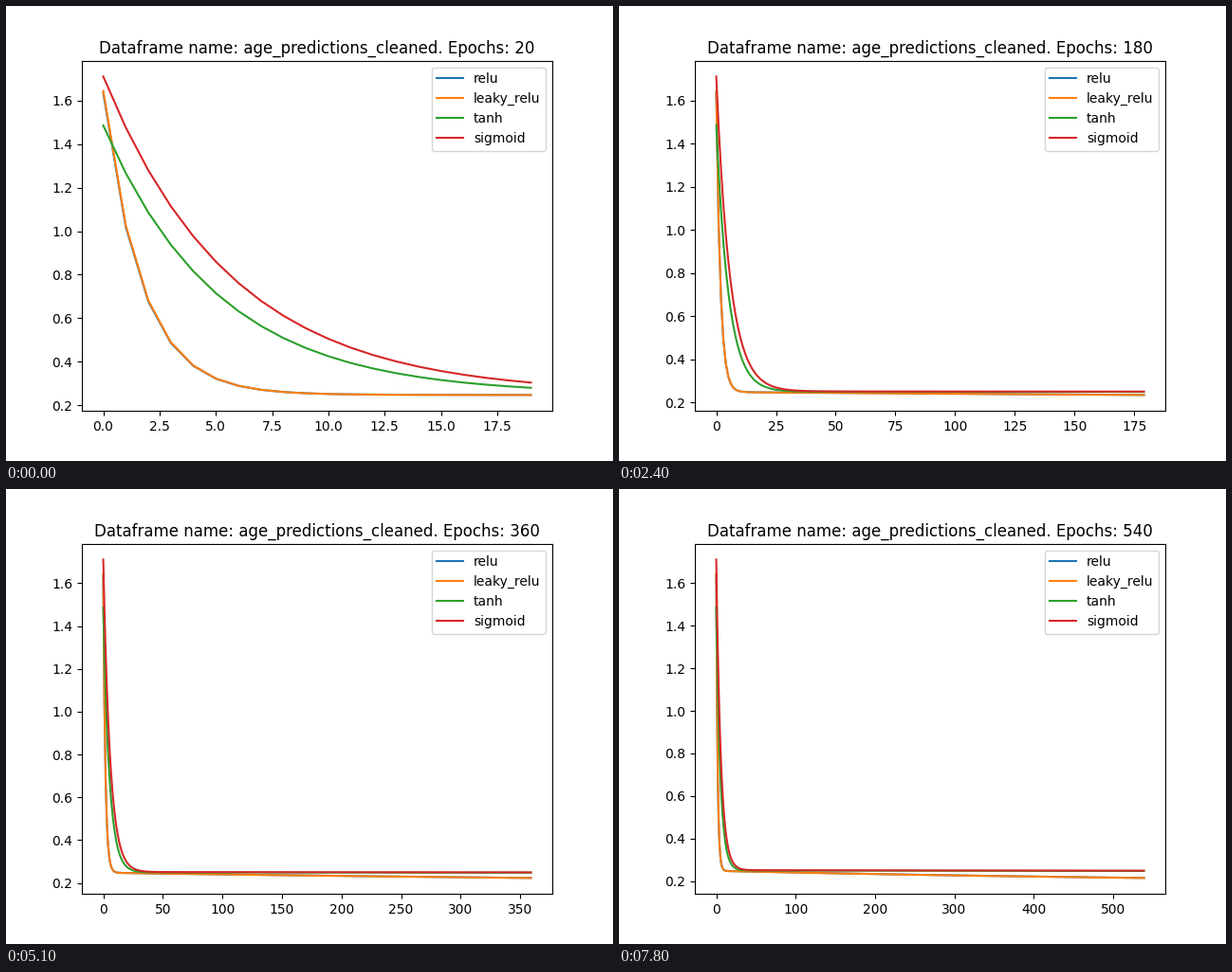
These frames come from a looping animation (640 by 480 pixels, 8000 ms). A matplotlib script:

```python
import numpy as np
import matplotlib.pyplot as plt
from matplotlib.animation import FuncAnimation

LOOP_MS = 8000
TICK_MS = 100
TICKS_PER_STEP = 3
EPOCHS_PER_STEP = 20


def saturating(start, floor, rate, drift):
    """Loss that decays geometrically to a slowly sinking floor."""
    return lambda t: floor + (start - floor) * rate ** t - drift(t)


def learning(t):
    return 0.0705 * (1 - np.exp(-t / 830))


def stalled(t):
    return 4e-6 * t


LOSSES = {
    "relu": saturating(1.635, 0.2483, 0.556, learning),
    "leaky_relu": saturating(1.645, 0.2479, 0.557, learning),
    "tanh": saturating(1.486, 0.2495, 0.8225, stalled),
    "sigmoid": saturating(1.711, 0.2510, 0.8395, stalled),
}

fig, ax = plt.subplots(figsize=(6.4, 4.8), dpi=100)
lines = {name: ax.plot([], [], label=name)[0] for name in LOSSES}
ax.legend(loc="upper right")


def draw(tick):
    epochs = EPOCHS_PER_STEP * (tick // TICKS_PER_STEP + 1)
    t = np.arange(epochs)
    for name, line in lines.items():
        line.set_data(t, LOSSES[name](t))
    ax.relim()
    ax.autoscale_view()
    ax.set_title(f"Dataframe name: age_predictions_cleaned. Epochs: {epochs}")
    return list(lines.values())


anim = FuncAnimation(fig, draw, frames=LOOP_MS // TICK_MS, interval=TICK_MS,
                     init_func=lambda: draw(0), repeat=True, repeat_delay=0)
plt.show()
```
